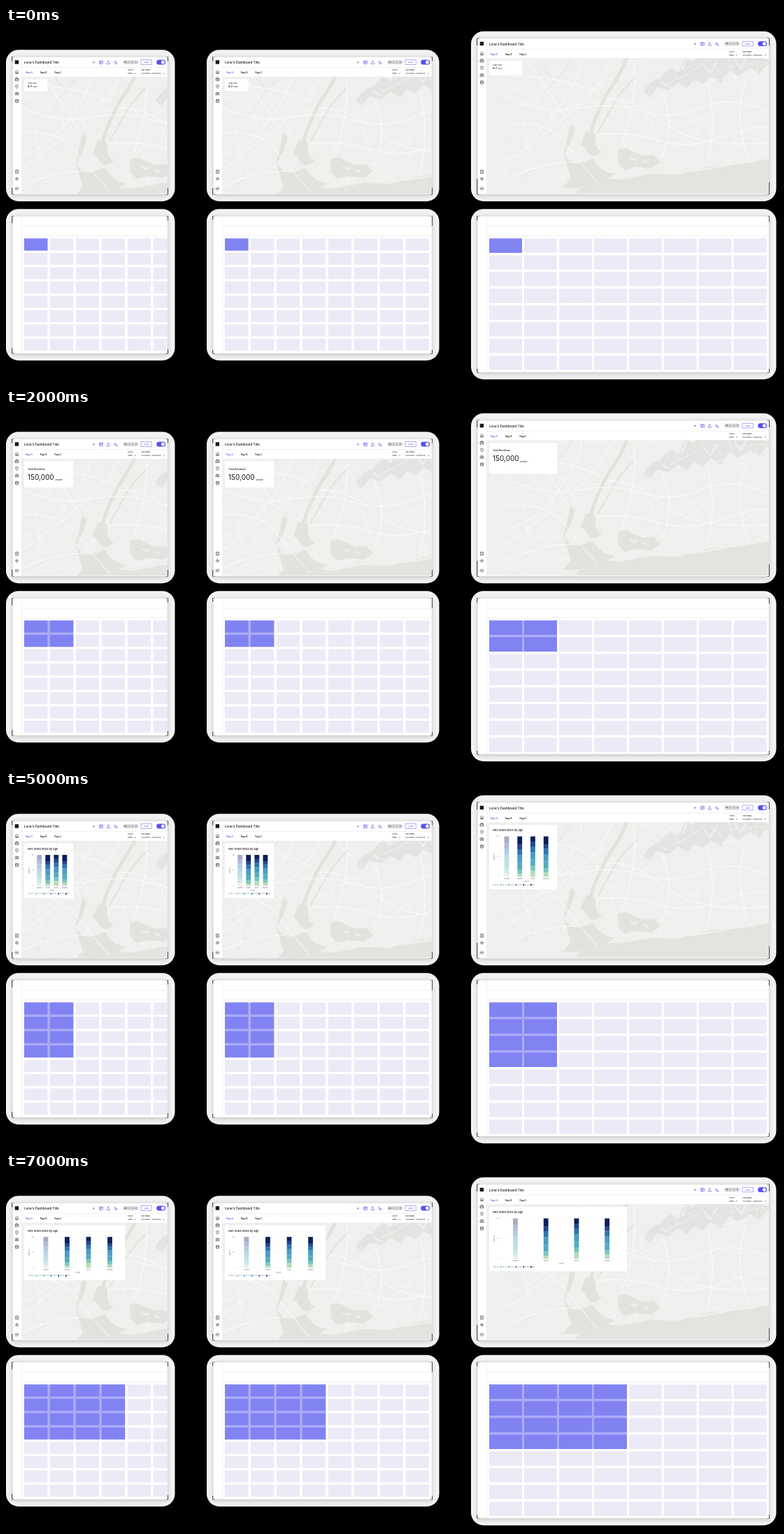
Recreate the animation shown at these times as an HTML page. Size 1104 by 507 pixels, loop 8000 ms.

```html
<!DOCTYPE html>
<html lang="en">
<head>
<meta charset="utf-8">
<title>Dashboard grid</title>
<style>
html, body { margin: 0; width: 100%; height: 100%; overflow: hidden; background: #000; }
svg { display: block; width: 1104px; height: 507px; }
text { font-family: Inter, "Liberation Sans", sans-serif; fill: #16161c; white-space: pre; }
.icon { fill: none; stroke: #3b3b44; stroke-width: .65; }
.tool { fill: none; stroke: #5b57ee; stroke-width: .65; }
.thin { fill: none; stroke: #ececef; stroke-width: .8; }
.mark { fill: none; stroke: #000; stroke-width: 1.2; }
</style>
</head>
<body>
<svg id="stage" viewBox="0 0 1104 507" xmlns="http://www.w3.org/2000/svg"></svg>
<script>
const STEP_MS = 1000;
// columns, rows and card content of each step
const STEPS = [
  [1, 1, "small"], [2, 1, "small"], [2, 2, "large"], [2, 3, "chart"],
  [3, 3, "chart"], [2, 4, "chart"], [3, 4, "chart"], [4, 4, "chart"]
];
// left / right / top shifts against the first screen, grid metrics, map shift
const SCREENS = [
  { id: 0, dx: 0, rx: 0, dy: 0, px: 36.93, cw: 33.4, py: 20.5, ch: 17.2, cols: 6, mx: 0, my: 0, end: 466, legs: [6, 6, 9, 9] },
  { id: 1, dx: 287, rx: 378, dy: 0, px: 36.93, cw: 33.4, py: 20.5, ch: 17.2, cols: 8, mx: 287, my: 0, end: 466, legs: [6, 6, 9, 9] },
  { id: 2, dx: 665, rx: 860, dy: -26.5, px: 49.95, cw: 47, py: 23.95, ch: 20.5, cols: 8, mx: 698, my: -13, end: 493, legs: [10, 10, 22, 17] }
];
const SHADES = ["#0b1f57", "#23468f", "#2f73b0", "#4a9dc0", "#55abc1", "#7cc5bd", "#b5ddb8"];
const BARS = [
  [.17, .13, .15, .18, .17, .11, .09],
  [.20, .12, .14, .20, .17, .10, .07],
  [.13, .12, .15, .17, .16, .12, .15],
  [.20, .11, .13, .18, .17, .11, .10]
];
const AGES = ["18-24", "25-34", "35-44", "45-54", "55-64", "65+"];
const GROUPS = ["All Metro", "Queens", "Bronx", "Brooklyn"];

const n = v => +v.toFixed(2);
const rect = (x, y, w, h, fill, extra = "") =>
  `<rect x="${n(x)}" y="${n(y)}" width="${n(w)}" height="${n(h)}" fill="${fill}" ${extra}/>`;
const text = (x, y, size, str, extra = "") =>
  `<text x="${n(x)}" y="${n(y)}" font-size="${size}" ${extra}>${str}</text>`;
const path = (d, cls, extra = "") => `<path class="${cls}" d="${d}" ${extra}/>`;
const move = (x, y, body) => `<g transform="translate(${n(x)} ${n(y)})">${body}</g>`;

function seeded(seed) {
  return () => (seed = (seed * 16807) % 2147483647) / 2147483647;
}

function streets() {
  const rnd = seeded(4711);
  let fine = "", wide = "";
  for (let i = 0; i < 260; i++) {
    let x = rnd() * 430 - 20, y = 50 + rnd() * 190;
    let a = (rnd() < .5 ? -.35 : 1.1) + (rnd() - .5) * .7;
    let d = `M${n(x)} ${n(y)}`;
    for (let k = 0; k < 4; k++) {
      const len = 4 + rnd() * (i % 9 ? 8 : 22);
      a += (rnd() - .5) * .5;
      x += Math.cos(a) * len;
      y += Math.sin(a) * len;
      d += `L${n(x)} ${n(y)}`;
    }
    if (i % 9) fine += d; else wide += d;
  }
  return `<path d="${fine}" stroke="#f6f6f5" stroke-width=".5"/><path d="${wide}" stroke="#f8f8f7" stroke-width=".8"/>`;
}

function mapArt() {
  const river = "M192 50C180 85 165 98 156 118S140 150 137 172";
  const bay = "M131 162Q146 158 145 172T154 190Q141 202 134 191T124 180ZM109 150L116 157 109 178 99 194 105 172Z" +
    "M100 194Q110 212 126 206T142 201Q151 219 172 222L160 230 120 242 98 242 110 228Z" +
    "M177 188Q188 182 198 190L212 196 228 195 238 205 225 214 203 212 187 216 178 207Z";
  const ocean = "M118 245L150 228 182 230 225 222 262 223 310 211 355 208 420 196V250H118Z";
  const sound = "M214 104Q222 88 238 84L252 68 263 76 274 54 284 61 297 50 420 48 420 62 388 67 379 79 366 70 349 82 337 73 324 91 310 82 299 93 286 88 276 99 263 91 249 102 233 98 222 112Z";
  const roads = "M10 108Q70 138 120 128T212 132 300 126 410 141M18 205Q70 168 112 132T165 64L181 48" +
    "M22 150Q76 146 98 174T148 234M48 60Q82 110 109 154M145 166Q195 160 235 174T330 168 410 158" +
    "M162 115Q200 112 245 150T410 176M200 60Q206 122 182 182M240 105Q260 150 240 198M305 90Q320 155 304 208" +
    "M20 82Q90 80 150 106M20 228Q70 205 112 205M360 88Q340 140 366 205M20 182Q58 176 92 128T126 52";
  const speckle = "M262 62l8 9 6-14M300 66l9 12 10-17M344 58l9 13 9-17M239 91l9 6M388 56l10 5";
  return `<g id="map" fill="none">
    ${rect(-20, 45, 440, 205, "#efefee")}
    <path d="${bay}${sound}" fill="#e3e3e1"/>${streets()}
    <path d="M113 54Q92 88 72 104M41 226l16-11M70 70l14 18" stroke="#e6e6e4" stroke-width="1.4"/>
    <path d="${river}" stroke="#e2e2df" stroke-width="5"/>
    <path d="M203 83Q181 103 169 125T148 163" stroke="#e3e3e0" stroke-width="2.2"/>
    <path d="${bay}" fill="#e2e2df"/><path d="${ocean}" fill="#e3e3e0"/>
    <path d="${speckle}" stroke="#f0f0ef" stroke-width="2"/>
    <path d="${roads}" stroke="#fbfbfa" stroke-width="1"/>
    <path d="M176 226Q230 217 268 218T410 190" stroke="#f0f0ee" stroke-width="2.4"/>
    <path d="M194 199l8 3 3-3M212 203l8 3" stroke="#efefed" stroke-width="2"/>
  </g>`;
}

// soft rounded surround, white screen and dark corner ticks
function frame(s, y, end, legs) {
  const x = 9.5 + s.dx, r = 231 + s.rx, [a, b, c, d] = legs;
  return rect(x - 9.5, y - 10.3, r - x + 20, end - y + 20.5, "#f3f3f3", 'rx="18"') +
    rect(x, y + 1, r - x, end - y + 1, "#000", 'opacity=".2" filter="url(#soft)"') +
    path(`M${x - .5} ${y + a}V${y}h3M${r + .3} ${y + b}V${y}h-3M${x - .5} ${end - c}V${end}h3M${r + .3} ${end - d}V${end}h-3`, "mark") +
    rect(x, y, r - x, end - y, "#fff", 'stroke="#dcdcdf" stroke-width=".5"');
}

function sidebar() {
  const at = (y, d) => move(15.5, y, path(d, "icon"));
  return at(63, "M-2.4 0L0 -2.4 2.4 0M-1.8 -.5V2.3H1.8V-.5M-.4 2.3V.6H.5V2.3") +
    at(73.3, "M-2.4 -1.2H2.4V2.2H-2.4ZM-1 -1.2V-2.3H1V-1.2M-2.4 .4H2.4") +
    at(84, "M0 2.6Q-4 -2.4 0 -2.5T0 2.6M-.5 -.5H.5") +
    at(94, "M-2.4 1.8V-.5L-1.6 -2H-.5V1.8ZM2.4 1.8V-.5L1.6 -2H.5V1.8ZM-.5 0H.5") +
    at(104.5, "M-2 -1.8Q0 -3 2 -1.8V1.8Q0 3 -2 1.8ZM-2 -1.6Q0 -.5 2 -1.6M-2 .2Q0 1.2 2 .2") +
    at(205.8, "M-1.9 -2.3H1.9V2.3H-1.9ZM-.8 -.8H.9M-.8 .6H.9") +
    at(216, "M-2.3 0L0 -2.3 2.3 0 0 2.3ZM-.7 0a.7 .7 0 1 0 1.4 0a.7 .7 0 1 0 -1.4 0") +
    `<circle cx="15.5" cy="230" r="3.6" fill="#dedee1"/>` +
    text(15.5, 230.8, 2.2, "NW", 'text-anchor="middle"');
}

function toolbar() {
  const at = (x, d) => move(x, 49.2, path(d, "tool"));
  const label = 'fill="#55555e"';
  const dots = ["NW", "J", "A", "R"].map((c, i) =>
    `<circle cx="${171 + i * 5}" cy="49" r="2.9" fill="#d6d6da"/>` +
    text(171 + i * 5, 49.8, 2.2, c, 'text-anchor="middle"')).join("");
  return at(125.3, "M-1.5 0H1.5M0 -1.5V1.5") +
    at(136, "M-2.3 -2.2H2.3V2.2H-2.3ZM-2.3 -.6H2.3M-.6 -.6V2.2") +
    at(146.3, "M-2 .5V2.4H2V.5M0 1V-2.4M-1.4 -1L0 -2.4 1.4 -1") +
    at(156.8, "M-.8 -2.1Q-3.1 1 0 2T2.1 .6Q-1.2 1.2 -.8 -2.1Z") +
    rect(167, 46, 22.5, 6, "#e6e6e9", 'rx="3"') + dots +
    rect(193, 45.6, 15.2, 6.8, "#fff", 'stroke="#8c89f2" stroke-width=".7"') +
    text(200.6, 50.1, 2.7, "Share", 'text-anchor="middle" style="fill:#5b57ee"') +
    rect(215.2, 45.5, 13, 7, "#5652ec", 'rx="3.5"') +
    `<circle cx="224.4" cy="49" r="2.5" fill="#fff"/>` +
    text(174, 61, 2.3, "Cohort", label) + text(174, 66.1, 2.6, "Cities") +
    text(193.5, 61, 2.3, "Date Range", label) +
    text(193.5, 66.1, 2.45, "01/01/2019 - 01/31/2023") +
    path("M184 64.8l.9 .9 .9-.9M225 64.8l.9 .9 .9-.9", "icon");
}

function dashboard(s) {
  const y = 41.5 + s.dy, r = 231 + s.rx;
  const left = 22.5 + s.dx, top = 69.8 + s.dy;
  const tabs = ["A", "B", "C"].map((c, i) =>
    text(28 + i * 20.7, 65.1, 2.95, "Page " + c, `font-weight="600" ${i ? "" : 'style="fill:#5b57ee"'}`)).join("");
  const head = rect(12.7, 46.2, 5.4, 5.4, "#17171c") +
    text(26, 51, 4.55, "Lena's Dashboard Title", 'font-weight="500"') + tabs;
  const side = sidebar();
  const lowStart = side.indexOf('<g transform="translate(15.5 205.8)');
  return frame(s, y, 238, s.legs) +
    `<clipPath id="clip${s.id}">${rect(left, top, r - left, 237.2 - top, "#fff")}</clipPath>` +
    `<g clip-path="url(#clip${s.id})"><use href="#map" x="${s.mx}" y="${s.my}"/></g>` +
    path(`M${left} ${y}V237.5M${left} ${56.5 + s.dy}H${r}`, "thin") +
    move(s.dx, s.dy, head + side.slice(0, lowStart)) +
    move(s.dx, 0, side.slice(lowStart)) +
    move(s.rx, s.dy, toolbar());
}

function gridPanel(s) {
  const x = 9.5 + s.dx, r = 231 + s.rx;
  let cells = "";
  for (let c = 0; c < s.cols; c++)
    for (let row = 0; row < 8; row++) {
      const cx = 26 + s.dx + c * s.px;
      cells += rect(cx, 301.5 + row * s.py, Math.min(s.cw, r - .3 - cx), s.ch, "#eceaf6");
    }
  const legs = s.id === 2 ? [6, 8, 5, 5] : s.id === 1 ? [5, 14, 5, 5] : [10, 6, 8, 6];
  return frame(s, 269.5, s.end, legs) +
    path(`M${x + 13} 269.5V${s.end}M${x + 13} 284H${r}M${x + 13} 297.8H${r}`, "thin") + cells;
}

function chart(w, h) {
  const left = 15.6, right = w - 6.4, top = 16.7, base = h - 18;
  const step = (right - left) / 4, mid = (left + right) / 2;
  const small = 'text-anchor="middle" style="fill:#666670"';
  let out = text(5, 9.2, 3.72, "Fare Share Index by Age", 'font-weight="500"') +
    path(`M${left} ${top}H${n(right)}M${left} ${n((top + base) / 2)}H${n(right)}M${left} ${n(base)}H${n(right)}`, "thin", 'style="stroke-width:.4"');
  ["100", "50", "0"].forEach((v, i) => {
    out += text(13.8, top + .8 + (base - top) * i / 2, 2, v, 'text-anchor="end" style="fill:#777780"');
  });
  out += `<g transform="translate(7.5 ${n((top + base) / 2)}) rotate(-90)">${text(0, 0, 2, "Share (%)", small)}</g>`;
  BARS.forEach((parts, i) => {
    const cx = left + step * (i + .5);
    let y = top, bar = "";
    parts.forEach((p, k) => {
      const ph = p * (base - top);
      bar += rect(cx - 3.4, y, 6.8, ph + .1, SHADES[k]);
      y += ph;
    });
    out += `<g opacity="${i ? 1 : .36}">${bar}</g>` + text(cx, base + 3.6, 2, GROUPS[i], small);
  });
  out += text(mid, h - 10.3, 2.2, "Cohort", small);
  AGES.forEach((age, i) => {
    const x = 5.3 + i * 10.7;
    out += rect(x, h - 7.4, 2, 2, SHADES[[6, 5, 3, 2, 1, 0][i]]) +
      text(x + 2.9, h - 5.7, 2, age, 'style="fill:#666670"');
  });
  return out;
}

const CONTENT = {
  small: () => text(5, 6.8, 2.5, "Total Visits") +
    text(5, 11.9, 4, "9.7", 'font-weight="600"') + text(12.4, 11.9, 2.15, "million"),
  large: () => text(5, 12.4, 3.4, "Total Residents", 'font-weight="500"') +
    text(5, 26.4, 10, "150,000") + text(44.4, 28, 3.2, "people"),
  chart
};

function stepArt(s, [cols, rows, kind]) {
  const w = (cols - 1) * s.px + s.cw, h = (rows - 1) * s.py + s.ch;
  let cells = rect(0, 0, w, h, "#abacf8");
  for (let c = 0; c < cols; c++)
    for (let r = 0; r < rows; r++)
      cells += rect(c * s.px, r * s.py, s.cw, s.ch, "#8183f3");
  return move(26 + s.dx, 73.4 + s.dy, rect(0, 0, w, h, "#fff", 'rx=".6"') + CONTENT[kind](w, h)) +
    move(26 + s.dx, 301.5, cells);
}

const stage = document.getElementById("stage");
stage.innerHTML = `<defs>${mapArt()}
  <filter id="soft" x="-10%" y="-10%" width="120%" height="120%"><feGaussianBlur stdDeviation="3.5"/></filter></defs>` +
  SCREENS.map(s => dashboard(s) + gridPanel(s)).join("") +
  STEPS.map(step => `<g class="step">${SCREENS.map(s => stepArt(s, step)).join("")}</g>`).join("");

const layers = [...document.querySelectorAll(".step")];
let shown = -1;
function tick() {
  const i = Math.floor(performance.now() / STEP_MS) % STEPS.length;
  if (i !== shown) {
    layers.forEach((el, k) => { el.style.display = k === i ? "" : "none"; });
    shown = i;
  }
  requestAnimationFrame(tick);
}
tick();
</script>
</body>
</html>
```
